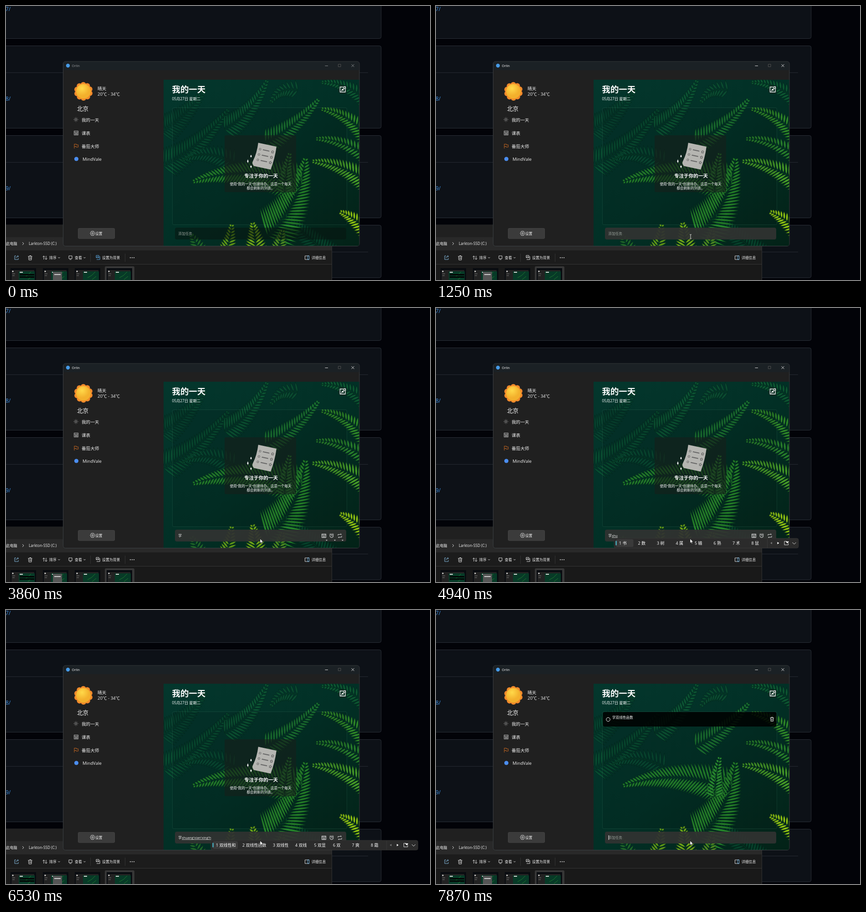
Recreate the animation shown at these times as an HTML page. Size 931 by 602 pixels, loop 8000 ms.

```html
<!DOCTYPE html>
<html lang="zh">
<head>
<meta charset="utf-8">
<style>
html, body { margin: 0; width: 100%; height: 100%; overflow: hidden; background: #020308; }
svg { display: block; width: 100vw; height: 100vh; }
text { font-family: 'Open Sans', 'Noto Sans CJK SC', 'Noto Sans CJK', sans-serif; white-space: pre; }
.line { fill: none; stroke: #eee; stroke-width: .9; }
</style>
</head>
<body>
<svg id="stage" viewBox="0 0 931 602"></svg>
<script>
const LOOP = 8000;
const $ = id => document.getElementById(id);
const text = (x, y, size, s, fill = '#f2f2f2', more = '') =>
  `<text x="${x}" y="${y}" font-size="${size}" fill="${fill}" ${more}>${s}</text>`;
const rect = (x, y, w, h, fill, r = 0, more = '') =>
  `<rect x="${x}" y="${y}" width="${w}" height="${h}" rx="${r}" fill="${fill}" ${more}/>`;
const path = (d, more = '') => `<path class="line" d="${d}" ${more}/>`;
const dot = (x, y, r, fill, more = '') => `<circle cx="${x}" cy="${y}" r="${r}" fill="${fill}" ${more}/>`;

// A frond along a quadratic curve from base to tip, with paired leaflets
function fern([x0, y0, cx, cy, x1, y1, width, color]) {
  const n = Math.round(Math.hypot(x1 - x0, y1 - y0) / 7);
  let d = '';
  for (let i = 0; i < n; i++) {
    const t = i / n, u = 1 - t;
    const x = u * u * x0 + 2 * u * t * cx + t * t * x1;
    const y = u * u * y0 + 2 * u * t * cy + t * t * y1;
    const a = Math.atan2(u * (cy - y0) + t * (y1 - cy), u * (cx - x0) + t * (x1 - cx));
    const len = width * Math.pow(u, .75) + 3;
    for (const side of [-1, 1]) {
      const b = a + side * (1.1 - .3 * t), c = Math.cos(b), s = Math.sin(b);
      const at = (f, h) => `${(x + c * len * f - s * h).toFixed(1)} ${(y + s * len * f + c * h).toFixed(1)}`;
      d += `M${at(0, 0)}Q${at(.4, 4.6)} ${at(1, 0)}Q${at(.4, -4.6)} ${at(0, 0)}`;
    }
  }
  return `<path d="${d}" fill="${color}" stroke="#02261a" stroke-width=".7"/>
    <path d="M${x0} ${y0}Q${cx} ${cy} ${x1} ${y1}" fill="none" stroke="#063b22"/>`;
}

const ferns = [
  [340, 275, 390, 250, 440, 180, 34, '#07422f'],
  [345, 350, 430, 310, 490, 225, 36, '#084c31'],
  [480, 270, 540, 240, 575, 160, 30, '#0c5534'],
  [500, 345, 440, 310, 385, 340, 28, '#084a32'],
  [640, 185, 600, 175, 580, 215, 20, '#0a4a30'],
  [800, 215, 750, 165, 690, 168, 22, '#0d5732'],
  [720, 560, 660, 500, 580, 440, 34, '#06402a'],
  [570, 300, 640, 265, 688, 203, 30, '#1b7431'],
  [800, 295, 755, 235, 690, 226, 26, '#2f8728'],
  [800, 335, 740, 290, 678, 292, 22, '#287e2b'],
  [800, 390, 740, 345, 670, 341, 30, '#479b27'],
  [650, 395, 530, 345, 408, 387, 50, '#25852c'],
  [575, 505, 645, 440, 658, 332, 62, '#288a2b'],
  [612, 410, 612, 370, 624, 320, 22, '#2f9a34'],
  [470, 570, 492, 530, 496, 477, 28, '#5d9417'],
  [550, 570, 550, 520, 541, 474, 34, '#6fa417'],
  [590, 570, 600, 530, 608, 490, 28, '#4c8620'],
  [430, 560, 425, 530, 405, 500, 26, '#1e6428'],
  [810, 510, 770, 465, 732, 452, 28, '#8fc111']
].map(fern).join('');

function page() {
  let s = rect(0, 0, 931, 602, '#020308');
  for (let i = 0; i < 4; i++) {
    const y = 87.5 + 197 * (i - 1);
    s += rect(-20, y, 843.8, i == 3 ? 115.5 : 181, '#0d1117', 4, 'stroke="#2b3038"');
    s += rect(0, y + 58.5, 795, 1, '#262b32');
    if (i < 3) s += text(-1, 11 + 197 * i, 12, 7 + i + '/', '#3f8fe0');
  }
  return s;
}

function explorer() {
  let s = rect(-9, 481, 724.5, 130, '#1c1c1c', 5, 'stroke="#333"')
    + rect(0, 481, 130, 27, '#202020') + rect(0, 508, 715, 29, '#292929')
    + rect(0, 568, 715, 34, '#191919') + rect(0, 567, 715, 1, '#353535')
    + text(0, 525, 8.2, '此电脑') + path('M36 519l3 3-3 3') + text(50, 525, 8.2, 'Larkton-SSD (C:)')
    + path('M22 549h-3v8h8v-3M22 554q0-4 5-4M25 548l2.5 2-2.5 2', 'style="stroke:#8cc4ec"')
    + path('M48.500 550h9M52 550v-1.500h2.500v1.500M49.500 550l.7 8h5.600l.7-8M52 552v4M54.500 552v4')
    + path('M83 557v-8l-2.500 2.500M83 549l2 2.500M88 549v8l-2.500-2.500M88 557l2.500-2.500')
    + path('M138 549h7v6h-7zM139.500 557h4M114.500 552l2 2 2-2M170.500 552l2 2 2-2')
    + `<g id="wall">${path('M198 548h6v5h-6zM206 550v7h-7M198 553l3-3 3 3')}</g>`
    + rect(185, 544, 1, 18, '#333') + rect(261, 544, 1, 18, '#333')
    + dot(273, 553, 1, '#eee') + dot(277, 553, 1, '#eee') + dot(281, 553, 1, '#eee')
    + path('M656.500 549h9v8h-9z') + path('M662 549h3.500v8H662z', 'style="stroke:#6db6e8"')
    + text(95, 556, 7.9, '排序') + text(151, 556, 7.9, '查看')
    + text(211, 556, 7.9, '设置为背景') + text(671, 556, 7.8, '详细信息')
    + rect(217, 572, 65, 40, '#373737', 3);
  [10, 81, 151, 221].forEach((x, i) => {
    s += rect(x, 576, 56, 26, '#080b10') + rect(x + 2, 580, 50, 22, '#222')
      + rect(x + 18, 583, 35, 19, '#073a27') + dot(x + 5, 583, 1.6, '#ddd')
      + rect(x + 20, 584, 7, 2, '#ddd') + rect(x + 4, 588, 6, 1, '#777') + rect(x + 4, 592, 5, 1, '#777')
      + path(`M${x + 28} 597l9-5 8-8M${x + 38} 601l9-7`, 'style="stroke:#237f30"');
    if (i == 1) s += rect(x + 22, 584, 20, 18, '#555') + rect(x + 25, 589, 14, 2, '#ccc');
    if (!i) s += rect(x + 20, 589, 32, 3, '#020403') + rect(x + 20, 594, 32, 3, '#020403');
  });
  return s;
}

function sun() {
  let s = '';
  for (let i = 0; i < 10; i++) {
    const a = i * Math.PI / 5 + .3;
    s += dot(170 + 14.6 * Math.cos(a), 187.5 + 14.6 * Math.sin(a), 6, '#f18a2b');
  }
  return s + dot(170, 187.5, 16, 'url(#sun)');
}

function sidebar() {
  let rays = '';
  for (let i = 0; i < 8; i++) {
    const a = i * Math.PI / 4, c = Math.cos(a), s = Math.sin(a);
    rays += `M${153.5 + 3.6 * c} ${249.5 + 3.6 * s}L${153.5 + 5 * c} ${249.5 + 5 * s}`;
  }
  return sun() + text(201, 184.5, 9.6, '晴天') + text(201, 197, 9.6, '20℃ - 34℃')
    + text(156, 229.500, 12.6, '北京')
    + dot(153.5, 249.5, 2, 'none', 'stroke="#aaa"') + path(rays, 'style="stroke:#aaa"')
    + path('M149.500 274.500h9v9h-9zM149.500 277h9M151.500 279.500h5.500M151.500 281.500h5.500M152 277v6M156 277v6', 'style="stroke:#bbb"')
    + path('M150 303v10M150 303.500h4.500v1.500h4v5h-4.500v-1.500h-4', 'style="stroke:#d06b22"')
    + dot(154.5, 336, 4.6, '#4b8def')
    + text(166, 253.7, 9.6, '我的一天') + text(166, 282.6, 9.6, '课表')
    + text(166, 311.6, 9.6, '番茄大师') + text(168, 340.4, 9.7, 'MindVale')
    + rect(158.5, 488.5, 80, 22.5, '#3b3b3b', 2, 'stroke="#444"')
    + path('M187.500 495h5l2.500 4.500-2.500 4.500h-5l-2.500-4.500z') + dot(190, 499.5, 1.8, 'none', 'stroke="#eee"')
    + text(196, 502.5, 7.8, '设置');
}

function emptyCard() {
  let rows = '';
  for (let i = 0; i < 3; i++) {
    const y = -13 + i * 12;
    rows += dot(-13, y, 2, 'none', 'stroke="#666"') + rect(-7, y - 1, 15, 2, '#666', 1)
      + path(`M15 ${y - 3}l1 2 2 .3-1.500 1.500.4 2.200-1.900-1-1.900 1 .4-2.200-1.500-1.500 2-.3z`, 'style="stroke:#555"');
  }
  const spark = (x, y, r) => `<path d="M${x} ${y - r}l1 ${r - 1} 1 1-1 1-1 ${r - 1}-1-${r - 1}-1-1 1-1z" fill="#fff"/>`;
  return `<g id="empty">` + rect(480, 284, 157, 125, '#15201b', 3, 'opacity=".62"')
    + `<g transform="translate(568 330) rotate(12)"><path d="M-20-26h41q2 26-2 52h-38q-6-5-4-10 5-20 3-42z" fill="#b5b5b1"/>${rows}</g>`
    + spark(538, 330, 3.4) + spark(531, 341, 4.4) + spark(538, 353, 3.4)
    + text(560, 377, 10.6, '专注于你的一天', '#fff', 'text-anchor="middle" font-weight="700"')
    + text(559, 393.7, 7.65, '使用“我的一天”创建待办。这是一个每天', '#fff', 'text-anchor="middle"')
    + text(559, 402.7, 7.65, '都会刷新的列表。', '#fff', 'text-anchor="middle"') + '</g>';
}

function app() {
  return rect(125.5, 122, 650.5, 405.5, '#202020', 5, 'stroke="#3c4043"')
    + '<path d="M126 141v-14q0-4.500 4.500-4.500H771q4.500 0 4.500 4.500v14z" fill="#1b2125"/>'
    + dot(136, 131, 4.2, '#469ae6')
    + `<g id="title">${text(144.5, 134, 7.6, 'Orlin', '#fff')}${path('M700.500 131.500h6.500M758.500 128l6 6M764.500 128l-6 6')}</g>`
    + path('M729.500 128h5.500v5.500h-5.500z', 'style="stroke:#555"') + sidebar()
    + `<g clip-path="url(#photo)">${rect(346, 162, 430, 366, 'url(#shade)')}${ferns}</g>`
    + text(364.5, 190, 18.4, '我的一天', '#fff', 'font-weight="700"')
    + text(364.5, 206.5, 8.3, '05月27日 星期二', '#fff')
    + rect(731, 175, 17, 17, '#10251f', 3, 'opacity=".7"')
    + path('M740 178h-6.500v11h11.500v-6M736 187l4-4M737 183h3.500v3M741.500 177.500h4v4h-4z', 'style="stroke:#fff;stroke-width:1.3"')
    + rect(365.5, 223.5, 383, 257, 'rgba(0,20,16,.13)', 3, 'stroke="rgba(120,200,160,.13)"')
    + emptyCard()
    + `<g id="task">${rect(366.5, 224, 381, 32, 'rgba(0,0,0,.85)', 4)}${dot(378, 240.5, 4.2, 'none', 'stroke="#fff"')}`
    + text(387, 238.5, 7.6, '学双线性函数', '#fff')
    + path('M733.500 237h8.500M736 237v-1.500h3.500v1.500M734.500 237l.7 7.500h5.200l.7-7.500M736.500 239v4M739 239v4') + '</g>'
    + rect(371, 487, 376, 26, 'rgba(8,18,14,.5)', 4)
    + `<g id="hover">${rect(371, 487, 376, 26, 'rgba(52,54,52,.85)', 4)}</g>`
    + text(378.3, 502.5, 7.7, '添加任务', '#98a09a', 'id="hint"')
    + text(378.3, 502.5, 7.7, '', '#f4f4f4', 'id="done"') + text(0, 502.5, 7.5, '', '#f4f4f4', 'id="typed"')
    + '<rect id="under" y="504" height=".8" fill="#ddd"/><rect id="caret" y="495" width="1" height="10" fill="#fff"/>'
    + '<g id="tools">' + path('M693.500 496.500h9v8h-9zM693.500 498.500h9M695 501h6M695 503h6')
    + dot(715, 500.5, 3.8, 'none', 'stroke="#eee"') + path('M715 498v2.500h2M710.500 497.500l2-2M719.500 497.500l-2-2')
    + path('M729 500v-2.500h7.500l-2-2M737 500.500v3h-7.500l2 2')
    + [704, 722, 739].map(x => `<path d="M${x - 2} 509.500h4l-2 2z" fill="#eee"/>`).join('') + '</g>';
}

$('stage').innerHTML = `<defs>
  <radialGradient id="sun" cx=".4" cy=".3"><stop stop-color="#ffd94a"/><stop offset="1" stop-color="#f3b02c"/></radialGradient>
  <linearGradient id="shade" x2="1" y2="1"><stop stop-color="#04372d"/><stop offset=".5" stop-color="#023026"/><stop offset="1" stop-color="#032217"/></linearGradient>
  <clipPath id="photo"><path d="M346 162H775.500V523q0 4-4 4H346z"/></clipPath></defs>`
  + page() + explorer() + app() + '<g id="popup"></g>'
  + '<path id="arrow" d="M0 0v9.500l2.200-2 1.500 3.300 1.500-.7-1.500-3.200h3z" fill="#fff" stroke="#111" stroke-width=".6"/>'
  + '<g id="beam">' + path('M-2-4.500h1.500l.5.500.5-.5H2M0-4v8M-2 4.500h1.500l.5-.5.500.500H2') + '</g>';

// Input method states: time, committed text, letters being typed, popup x, candidates
const line = '双线性 双线型 双线形 双线星 双线 双显 双 爽';
const final = '双线性函数 双线性 双线 双显 双 爽 霜 双向';
const steps = [
  [0, '', ''],
  [2310, '', 'x'],
  [2380, '', 'x', 379, '下 先 想 小 向 行 像 写'],
  [2580, '', 'xu', 384, '需 许 续 徐 须 序 虚 叙'],
  [2720, '', 'xue', 384, '学 雪 血 穴 靴 薛 削 噱'],
  [3860, '学', ''],
  [4660, '学', 's', 387, '是 上 时 说 三 四 死 事'],
  [4800, '学', 'sh', 391, '是 上 时 说 事 谁 少 水'],
  [4930, '学', 'shu', 391, '书 数 树 属 输 熟 术 鼠'],
  [5060, '学', 'shua', 391, '刷 耍 唰 双 爽 栓 涮 霜'],
  [5200, '学', 'shuan', 391, '栓 涮 拴 闩 双 爽 霜 刷'],
  [5330, '学', 'shuang', 391, '双 爽 霜 孀 双双 双向 爽快 双手'],
  [5400, '学', "shuang'x", 391, '双休 双向 双 爽 霜 双线 双学 双喜'],
  [5530, '学', "shuang'xia", 427, '双下 双峡 双 爽 霜 双虾 孀 双侠'],
  [5600, '学', "shuang'xian", 427, '双线 双显 双向(xiang) 双 爽 霜 双害 双溪'],
  [5810, '学', "shuang'xian'x", 427, '双线 双显 双向(xiang) 双 爽 霜 双害 双溪'],
  [6060, '学', "shuang'xian'xi", 438, line],
  [6270, '学', "shuang'xian'xing", 443, line],
  [6530, '学', "shuang'xian'xing'h", 450, '双线性和 双线性函数 双线性 双线 双显 双 爽 霜'],
  [6660, '学', "shuang'xian'xing'ha", 459, '双线性函数 双线性和 双线性 双线 双显 双 爽 霜'],
  [6740, '学', "shuang'xian'xing'han", 467, final],
  [6870, '学', "shuang'xian'xing'han's", 467, final],
  [6950, '学', "shuang'xian'xing'han'sh", 467, final],
  [7020, '学', "shuang'xian'xing'han'shu", 467, final],
  [7350, '学双线性函数', ''],
  [7610, '', '']
];
const caretOn = [[720, 1250], [1780, 2310], [2850, 3400], [3930, 4460], [7870, 8000]];

function popup(x, words) {
  let at = x + 11, s = '', first;
  words.split(' ').forEach((word, i) => {
    const w = Math.max(41.5, [...word].reduce((sum, c) => sum + (c > 'z' ? 9 : 4.3), 22));
    first = first || w;
    s += text(at, 520, 9, `${i + 1} ${word}`, '#fff');
    at += w;
  });
  const a = at + 2;
  return rect(x, 506, at + 62 - x, 21.5, '#2b2b2b', 4, 'stroke="#3a3a3a" stroke-width=".6"')
    + rect(x + 4, 508, first - 3, 17, '#3a3a3a', 3) + rect(x + 3.5, 511.5, 2, 10, '#4cc9dd', 1) + s
    + rect(a - 9, 507, .8, 20, '#3c3c3c')
    + `<path d="M${a + 2} 514v5l-4-2.500z" fill="#777"/><path d="M${a + 13.5} 514v5l4-2.500z" fill="#fff"/>`
    + path(`M${a + 34} 512.500h-5v8h8.500v-4M${a + 46.500} 515l4 4 4-4`)
    + `<path d="M${a + 35.5} 517l-3-3q0-2.500 3-1 3-1.500 3 1z" fill="#fff"/>`;
}

const show = (id, on) => $(id).setAttribute('opacity', +on);
const ramp = (t, a, b) => Math.min(1, Math.max(0, (t - a) / (b - a)));
let last, endX = 378.3;

function setStep(step) {
  const [, done, typed, x, words] = last = step;
  $('done').textContent = done;
  $('typed').textContent = typed;
  const start = 378.3 + (done ? $('done').getComputedTextLength() : 0);
  const len = typed ? $('typed').getComputedTextLength() : 0;
  endX = start + len;
  $('typed').setAttribute('x', start);
  $('under').setAttribute('x', start);
  $('under').setAttribute('width', len);
  $('popup').innerHTML = x ? popup(x, words) : '';
  show('hint', !done && !typed);
}

function frame() {
  const t = performance.now() % LOOP;
  const step = steps.findLast(s => s[0] <= t);
  if (step != last) setStep(step);

  const active = t >= 720;
  show('title', active ? 1 : .55);
  $('wall').firstChild.style.stroke = active ? '#eee' : '#5eb0ee';
  show('hover', ramp(t, 330, 520) * .55 + ramp(t, 720, 930) * .45);
  show('tools', t >= 3860 && t < 7610);
  show('empty', t < 7610);
  show('task', t < 7610 ? 0 : .5 + .5 * ramp(t, 7610, 7740));

  $('caret').setAttribute('x', endX + .5);
  show('caret', caretOn.some(([a, b]) => t >= a && t < b));

  const p = ramp(t, 70, 520), ease = p * p * (3 - 2 * p);
  const beam = t >= 500 && t < 2380;
  $('arrow').setAttribute('transform', `translate(${246 + 312 * ease} ${570 - 63 * ease})`);
  $('beam').setAttribute('transform', 'translate(559 506.5)');
  show('beam', beam);
  show('arrow', t >= 70 && !beam);
  requestAnimationFrame(frame);
}
frame();
</script>
</body>
</html>
```
